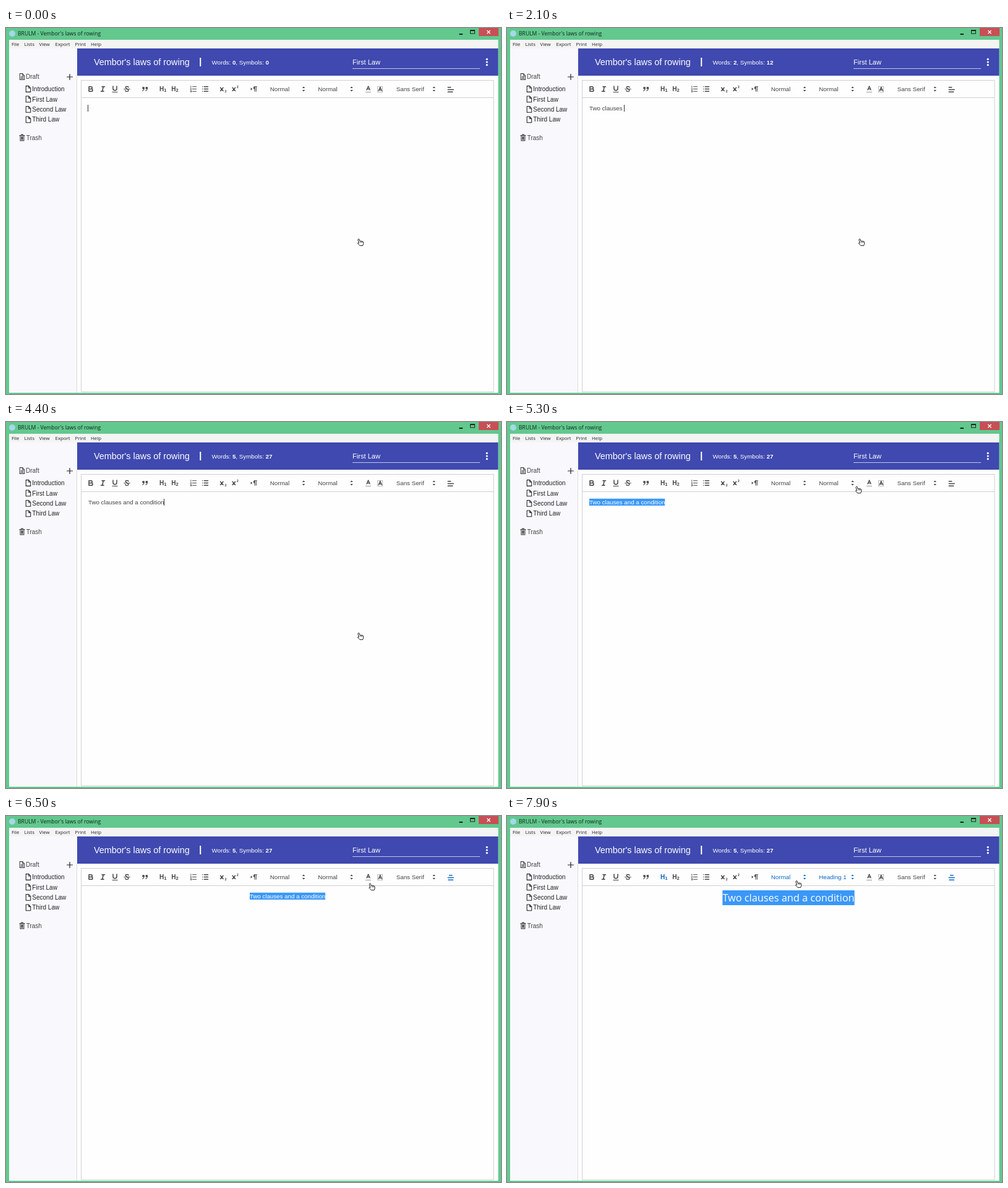
An HTML page with a canvas for the animation above (8 s loop, 800x591 px).

```html
<!DOCTYPE html>
<html lang="en">
<head>
<meta charset="utf-8">
<title>Text editor</title>
<style>
html, body { margin: 0; width: 100%; height: 100%; overflow: hidden; }
canvas { display: block; }
</style>
</head>
<body>
<canvas id="stage" width="800" height="591"></canvas>
<script>
const ctx = document.getElementById('stage').getContext('2d');
const LOOP = 8000, STEP = 100;
const SANS = '"Liberation Sans", Arial, sans-serif';
const UI = '"Open Sans", "Noto Sans", sans-serif';
const INK = '#444', BLUE = '#0a66c8', PALE = '#ccc', SELECT = '#3a97f8';
const APP = 'BRULM', BOOK = "Vembor's laws of rowing";
const PHRASE = 'Two clauses and a condition';
const BODY = 9.75, LEFT = 133, MIDDLE = 455, TOOL_Y = 98.5;

// Moment at which each letter of the phrase appears
const KEYS = [300, 500, 700, 900, 1000, 1100, 1200, 1300, 1500, 1700, 1900, 2000,
  2300, 2400, 2500, 2600, 2800, 2900, 3100, 3300, 3400, 3500, 3800, 3900, 4000, 4200, 4300];

// Pointer stops: time, x, y
const STOPS = [[0, 573, 346], [4400, 573, 346], [4700, 257, 131], [4800, 257, 131], [5100, 134, 131],
  [5400, 720, 102], [5600, 720, 102], [5800, 723, 137], [6200, 723, 137], [6700, 520, 102],
  [7000, 520, 102], [7300, 548, 121], [7500, 548, 121], [7900, 471, 110]];
const DRAG = [4800, 5100], ALIGN_OPEN = 5500, CENTERED = 5900, STYLE_OPEN = 6800, HEADED = 7500;

function rect(x, y, w, h, color) {
  ctx.fillStyle = color;
  ctx.fillRect(x, y, w, h);
}

function frame(x, y, w, h, color) {
  ctx.strokeStyle = color;
  ctx.lineWidth = 1;
  ctx.strokeRect(x, y, w, h);
}

function dot(x, y, r, color) {
  ctx.fillStyle = color;
  ctx.beginPath();
  ctx.arc(x, y, r, 0, 7);
  ctx.fill();
}

// Writes text around a vertical middle and returns its right edge
function text(str, x, midY, size, color = INK, { family = SANS, style = '', align = 'left' } = {}) {
  ctx.font = `${style} ${size}px ${family}`;
  ctx.textAlign = align;
  ctx.fillStyle = color;
  ctx.fillText(str, x, midY + size * 0.36);
  return x + ctx.measureText(str).width;
}

function widthOf(str, size) {
  ctx.font = `${size}px ${SANS}`;
  return ctx.measureText(str).width;
}

// Draws paths on an 18-unit grid centred on a point
function icon(cx, cy, line, { color = INK, fill = '', width = 2 } = {}) {
  ctx.save();
  ctx.translate(cx - 6.75, cy - 6.75);
  ctx.scale(0.75, 0.75);
  ctx.strokeStyle = ctx.fillStyle = color;
  ctx.lineWidth = width;
  ctx.lineJoin = ctx.lineCap = 'round';
  ctx.stroke(new Path2D(line));
  if (fill) ctx.fill(new Path2D(fill));
  ctx.restore();
}

const ALIGNS = ['M3 9H15M3 14H13M3 4H9', 'M3 9H15M4 14H14M6 4H12', 'M3 9H15M5 14H15M9 4H15', 'M3 9H15M3 14H15M3 4H15'];
const LETTER_A = 'M5.5 11L9 3L12.5 11M6.4 9H11.6';

function arrows(x, color) {
  icon(x, TOOL_Y, '', { color, fill: 'M6 11H12L9 14.2zM6 7H12L9 3.8z' });
}

function popup(x, y, w, h) {
  ctx.save();
  ctx.shadowColor = 'rgba(0,0,0,.25)';
  ctx.shadowBlur = 5;
  ctx.shadowOffsetY = 1;
  rect(x, y, w, h, '#fff');
  ctx.restore();
  frame(x, y, w, h, PALE);
}

function pageIcon(x, y) {
  icon(x, y, 'M4 2.5H10L14 7V15.5H4zM10 2.5V7H14', { color: '#222', width: 1.4 });
}

function drawWindow() {
  rect(0, 0, 800, 591, '#62c88e');
  dot(10, 9, 5, '#a5d8ea');
  text(`${APP} - ${BOOK}`, 19, 9.3, 8.6, '#10241a', { family: UI });
  rect(732.5, 9, 5.5, 2, '#14251c');
  frame(750.5, 3.5, 7, 5.5, '#14251c');
  rect(750, 3, 8, 2, '#14251c');
  rect(764, 0, 32, 13, '#c74f55');
  icon(780, 6.5, 'M6 6L12 12M12 6L6 12', { color: '#fff', width: 1.7 });

  rect(5, 19, 790.5, 14, '#f4f4f4');
  [['File', 9], ['Lists', 29.5], ['View', 53.5], ['Export', 79.5], ['Print', 111.5], ['Help', 137]]
    .forEach(([name, x]) => text(name, x, 26, 7.9, '#222', { family: UI }));
  rect(5, 33, 790.5, 556, '#fefefe');
}

function drawSidebar() {
  rect(5, 33, 109.5, 556, '#f9f8fc');
  rect(114, 77, 1, 512, '#dcdce0');
  icon(26, 78.5, 'M4 2.5H10L14 7V15.5H4zM10 2.5V7H14M6.5 9.5H11.5M6.5 12.5H11.5', { width: 1.4 });
  text('Draft', 32, 78.5, 10);
  icon(103, 79, 'M9 3V15M3 9H15', { color: '#222', width: 1.6 });
  ['Introduction', 'First Law', 'Second Law', 'Third Law'].forEach((name, i) => {
    const y = 98.5 + i * 16.45;
    pageIcon(36, y);
    text(name, 42.3, y, 10, '#222');
  });
  icon(26, 177, 'M3.5 4.5H14.5M7 4V2.5H11V4M5 4.5V15.5H13V4.5M7.5 7V13M9 7V13M10.5 7V13', { width: 1.4 });
  text('Trash', 32.7, 177, 10);
}

function drawHeader(typed) {
  rect(115, 33, 680.5, 44, '#3f49af');
  text(BOOK, 142, 55, 14.4, '#fff');
  rect(313.2, 48, 2, 14, '#fff');
  const words = typed.split(' ').filter(Boolean).length;
  const bold = { style: 'bold' };
  let x = text('Words: ', 332.5, 55.2, BODY, '#fff');
  x = text(words, x, 55.2, BODY, '#fff', bold);
  x = text(', Symbols: ', x, 55.2, BODY, '#fff');
  text(typed.length, x, 55.2, BODY, '#fff', bold);
  text('First Law', 560, 55, 11.1, '#fff');
  rect(560, 65, 206, 1, '#c3c6e6');
  [50.3, 55, 59.7].forEach(y => dot(777.2, y, 1.6, '#fff'));
}

function drawToolbar(t, pointer) {
  const y = TOOL_Y, thin = { width: 1.3 };
  const headed = t >= HEADED;
  const styleOpen = t >= STYLE_OPEN && !headed;
  const alignOpen = t >= ALIGN_OPEN && t < CENTERED;
  const over = (a, b) => pointer.y > 89 && pointer.y < 112 && pointer.x > a && pointer.x < b;

  frame(121.5, 84.5, 666.5, 503, '#d0d0d0');
  rect(122, 112, 666, 1, '#d0d0d0');
  icon(137, y, 'M5 4H9.5A2.5 2.5 0 0 1 9.5 9H5zM5 9H10.5A2.5 2.5 0 0 1 10.5 14H5z');
  icon(156.5, y, 'M7 4H13M5 14H11M8 14L10 4');
  icon(176, y, 'M5 3V8A4 4 0 0 0 13 8V3');
  rect(171.5, 103, 9, 1, INK);
  icon(195.5, y, 'M12.5 5.5C12 3 6 3 5.8 5.8C5.8 8.5 12.3 8.5 12.3 12C12 15 6 15 5.3 12.3', { width: 1.7 });
  icon(195.5, y, 'M2.5 9.3H15.5', thin);
  icon(224.5, y, 'M7 8C7 11 5 12.5 4 13M14 8C14 11 12 12.5 11 13', { fill: 'M3.5 4.5H8V9H3.5zM10.5 4.5H15V9H10.5z', width: 1.6 });
  ['1', '2'].forEach((n, i) => {
    const x = 248 + i * 19.3, color = headed && i === 0 ? BLUE : INK;
    text('H', x, y, 10, color, { style: 'bold' });
    text(n, x + 7.2, y + 1.5, 7.5, color, { style: 'bold' });
  });
  icon(303, y, 'M7 4H15M7 9H15M7 14H15', { width: 1.6 });
  icon(303, y, 'M2.5 3.5L3.5 2.5V6M2.5 8H4.5L2.5 10.8H4.5M2.5 12.5H4.5V15.5H2.5M3 14H4.5', { width: 1 });
  icon(322, y, 'M6.5 4H15M6.5 9H15M6.5 14H15M3 4H3.1M3 9H3.1M3 14H3.1', { width: 1.7 });
  icon(351, y, 'M3 6L9 13M9 6L3 13');
  text('2', 353.4, 101.7, 5.5, INK, { style: 'bold' });
  icon(370.5, y, 'M3 6L9 13M9 6L3 13');
  text('2', 372.8, 95.5, 5.5, INK, { style: 'bold' });
  icon(400.5, y, 'M11 4V14M14 4V14M10 4H15.5', { width: 1.4, fill: 'M2.5 6L6 9L2.5 12zM11 3.5A3 3 0 0 0 11 9.5z' });

  const sizeColor = over(421, 490) ? BLUE : INK;
  text('Normal', 426.7, y, BODY, sizeColor);
  arrows(481, sizeColor);

  const styleColor = styleOpen ? PALE : headed || over(498, 566) ? BLUE : INK;
  if (styleOpen) frame(498.5, 90.5, 67, 16.5, '#d5a63c');
  text(headed ? 'Heading 1' : 'Normal', 504.2, y, BODY, styleColor);
  arrows(558.5, styleColor);

  icon(585.5, y, LETTER_A, { width: 1.7 });
  rect(581, 103, 9, 1, '#999');
  ctx.save();
  ctx.setLineDash([1, 1]);
  frame(600.5, 94.5, 8, 9, '#777');
  ctx.restore();
  icon(604.7, y + 1.5, LETTER_A, { width: 1.7 });

  text('Sans Serif', 630.7, y, BODY);
  arrows(691.7, INK);
  const centered = t >= CENTERED;
  const alignColor = alignOpen ? PALE : centered || over(708, 729) ? BLUE : INK;
  icon(718.7, y + 1, ALIGNS[centered ? 1 : 0], { color: alignColor });
  if (alignOpen) frame(708.5, 90.5, 20.5, 16.5, '#d5a63c');
}

function drawEditor(t, typed) {
  if (t >= HEADED) {
    rect(348.3, 120, 213.3, 24, SELECT);
    text(PHRASE, MIDDLE, 132.6, 16.3, '#fff', { family: UI, align: 'center' });
    return;
  }
  const full = widthOf(typed, BODY);
  const x = t >= CENTERED ? MIDDLE - full / 2 : LEFT;
  text(typed, x, 129.3, BODY);
  const part = Math.min(1, Math.max(0, (t - DRAG[0]) / (DRAG[1] - DRAG[0])));
  if (!part) {
    rect(Math.round(x + full - 0.8), 124, 1, 11, '#333');
    return;
  }
  ctx.save();
  ctx.beginPath();
  ctx.rect(x + full * (1 - part), 123.7, full * part, 11.3);
  ctx.clip();
  rect(x, 123, full, 13, SELECT);
  text(typed, x, 129.3, BODY, '#fff');
  ctx.restore();
}

function drawMenus(t, pointer) {
  if (t >= ALIGN_OPEN && t < CENTERED) {
    popup(707.5, 107, 22, 78);
    ALIGNS.forEach((path, i) => {
      const y = 119 + i * 18;
      const active = i === 0 || Math.abs(pointer.y - y) < 9;
      icon(718.7, y, path, { color: active ? BLUE : INK });
    });
  }
  if (t >= STYLE_OPEN && t < HEADED) {
    popup(498.5, 107, 100, 157);
    const scales = [2, 1.5, 1.17, 1, 0.83, 0.67];
    const rows = [119.5, 143, 165.3, 186.6, 208, 229.7];
    scales.forEach((scale, i) => {
      const active = pointer.y > 110 && Math.abs(pointer.y - rows[i]) < 10;
      text(`Heading ${i + 1}`, 504.3, rows[i], BODY * scale, active ? BLUE : INK);
    });
    text('Normal', 504.3, 250.5, BODY, BLUE);
  }
}

function pointerAt(t) {
  const i = STOPS.findIndex(stop => stop[0] > t);
  if (i < 0) return { x: 471, y: 110 };
  const [t0, x0, y0] = STOPS[i - 1], [t1, x1, y1] = STOPS[i];
  const p = (t - t0) / (t1 - t0), ease = p * p * (3 - 2 * p);
  return { x: x0 + (x1 - x0) * ease, y: y0 + (y1 - y0) * ease };
}

const HAND = new Path2D('M-3.2-5.3Q-2-5.5-1.8-4.2L-1.3-1.8L2.6-1.7Q4.6-1.4 4.6.5V2.6L3.6 5.4H-1.2L-4.4 2Q-4.8.6-3.3.8L-2.6 1.4L-4.2-4Q-4.2-5-3.2-5.3z');
const KNUCKLES = new Path2D('M-.2-1.5V1M1.4-1.4V1M3-1.3V1');

function drawPointer({ x, y }) {
  ctx.save();
  ctx.translate(x, y);
  ctx.fillStyle = '#fff';
  ctx.strokeStyle = '#1c1c1c';
  ctx.lineJoin = 'round';
  ctx.lineWidth = 1;
  ctx.fill(HAND);
  ctx.stroke(HAND);
  ctx.lineWidth = 0.6;
  ctx.stroke(KNUCKLES);
  ctx.restore();
}

function draw(now) {
  const t = Math.floor((now % LOOP) / STEP) * STEP;
  const typed = PHRASE.slice(0, KEYS.filter(key => key <= t).length);
  const pointer = pointerAt(t);
  drawWindow();
  drawSidebar();
  drawHeader(typed);
  drawToolbar(t, pointer);
  drawEditor(t, typed);
  drawMenus(t, pointer);
  drawPointer(pointer);
}

let start;
function tick(now) {
  start ??= now;
  draw(Math.max(0, now - start));
  requestAnimationFrame(tick);
}
draw(0);
requestAnimationFrame(tick);
</script>
</body>
</html>
```
